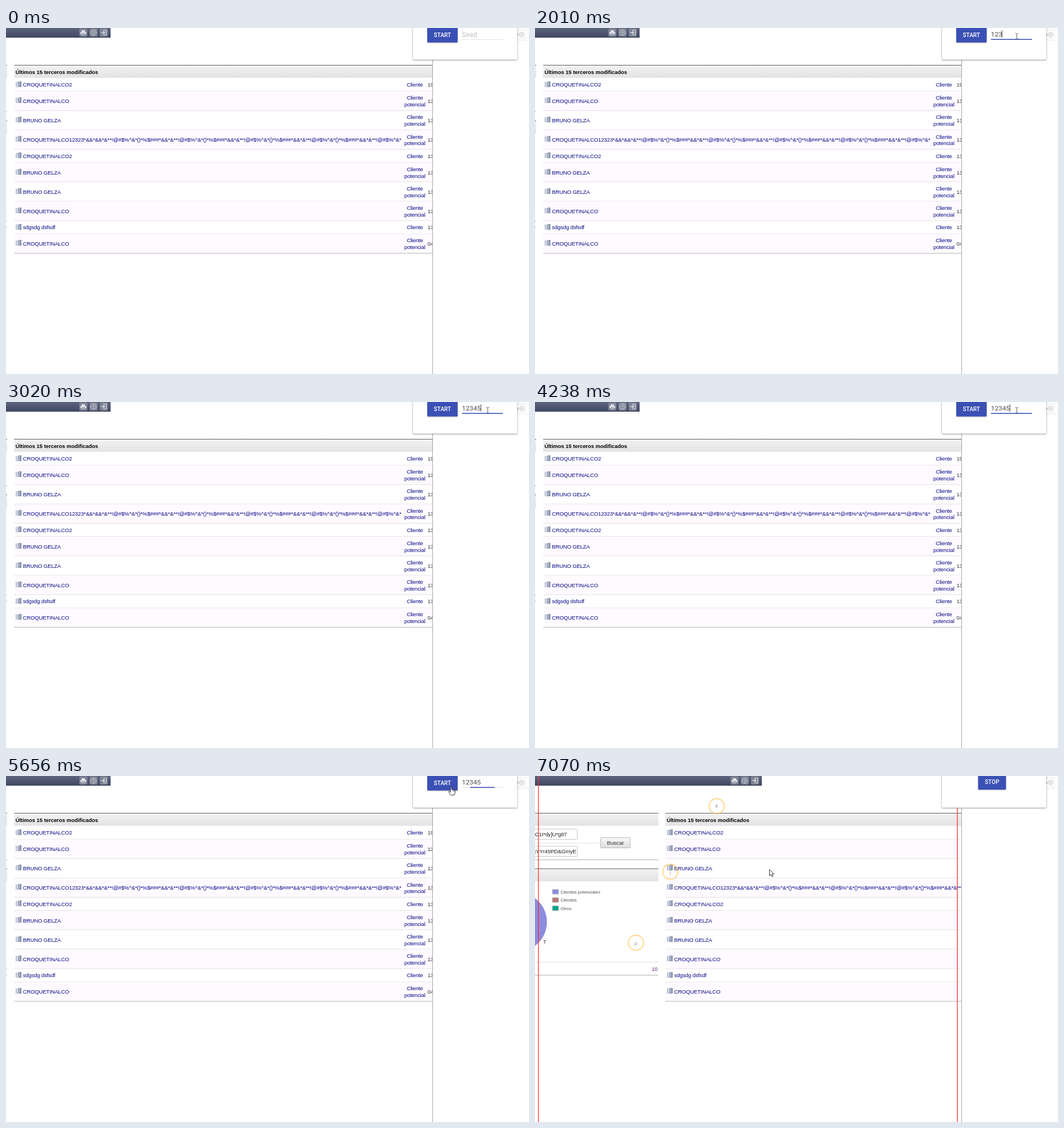
Write an HTML page with a canvas that moves like this. It is 920 by 609 pixels and loops after 8000 ms.

```html
<!DOCTYPE html>
<html lang="es">
<head>
<meta charset="utf-8">
<title>Terceros</title>
<style>
html, body { margin: 0; width: 100%; height: 100%; overflow: hidden; background: #fff; }
canvas { display: block; width: 920px; height: 609px; }
</style>
</head>
<body>
<canvas id="stage" width="920" height="609"></canvas>
<script>
const ctx = document.getElementById('stage').getContext('2d');
const LOOP = 8000;
const ZOOM = 0.775;
const EDGE = 968 * ZOOM;
const SCROLL = 215;
const ARIAL = '"Liberation Sans", Arial, sans-serif';
const ROBOTO = 'Roboto, sans-serif';
const BODY = { tracking: -0.18 };
const BODY_SIZE = 9.6;
const LINK = '#0a0a86';
const INDIGO = '#3a50b4';

// Each state holds until the next one starts.
const STATES = [
  { at: 0, hint: true },
  { at: 1000, focus: 1, cursor: beam, x: 847, y: 9 },
  { at: 2010, focus: 1, text: '123', caret: true, cursor: beam, x: 847, y: 9 },
  { at: 3020, focus: 1, text: '12345', caret: true, cursor: beam, x: 847, y: 9 },
  { at: 5050, focus: 0.6, text: '12345', cursor: hand, x: 778, y: 18 },
  { at: 6060, running: true, cursor: arrow, x: 362, y: 64 },
  { at: 7070, running: true, scrolled: true, cursor: arrow, x: 412, y: 164 }
];

const SHOP = 'CROQUETINALCO';
const PERSON = 'BRUNO GELZA';
const NOISE = '!@#$%^&*()*%$###*&&*&**';
const LONG = SHOP + '12323*&&*&&*&**' + NOISE.repeat(4) + '!@#$%^&*';
const ROWS = [
  { name: SHOP + '2', day: '19' },
  { name: SHOP, prospect: true },
  { name: PERSON, prospect: true },
  { name: LONG, prospect: true },
  { name: SHOP + '2' },
  { name: PERSON, prospect: true },
  { name: PERSON, prospect: true },
  { name: SHOP, prospect: true },
  { name: 'sdgsdg dsfsdf' },
  { name: SHOP, prospect: true, day: '04' }
];

function box(x, y, w, h, fill) {
  ctx.fillStyle = fill;
  ctx.fillRect(x, y, w, h);
}

function rule(x, y, w, color) {
  box(x, y, w, ZOOM, color);
}

function rounded(x, y, w, h, radius, fill) {
  ctx.beginPath();
  ctx.roundRect(x, y, w, h, radius);
  ctx.fillStyle = fill;
  ctx.fill();
}

function frame(x, y, w, h, fill, stroke, radius = 0) {
  rounded(x + 0.5, y + 0.5, w - 1, h - 1, radius, fill);
  ctx.strokeStyle = stroke;
  ctx.lineWidth = ZOOM;
  ctx.stroke();
}

function label(text, x, y, size, color, { font = ARIAL, weight = 400, align = 'left', tracking = 0 } = {}) {
  ctx.font = `${weight} ${size}px ${font}`;
  ctx.letterSpacing = `${tracking}px`;
  ctx.textAlign = align;
  ctx.fillStyle = color;
  ctx.fillText(text, x, y);
}

function fade(y, h, top, bottom) {
  const g = ctx.createLinearGradient(0, y, 0, y + h);
  g.addColorStop(0, top);
  g.addColorStop(1, bottom);
  return g;
}

function line(points, color, width = 1) {
  ctx.beginPath();
  points.forEach(([x, y]) => ctx.lineTo(x, y));
  ctx.strokeStyle = color;
  ctx.lineWidth = width;
  ctx.stroke();
}

function shadowed(alpha, blur, draw) {
  ctx.save();
  ctx.shadowColor = `rgba(0,0,0,${alpha})`;
  ctx.shadowBlur = blur;
  ctx.shadowOffsetY = 0.8;
  draw();
  ctx.restore();
}

function panelHead(x, y, w) {
  box(x, y, w, 22.5, fade(y, 22, '#f4f3f4', '#e4e2e4'));
  rule(x, y, w, '#333338');
}

function toolbar() {
  box(-10, 0, 409, 17, fade(0, 17, '#5c647e', '#3f4660'));
  const ink = '#dfe1e6';
  for (const x of [344, 362, 380]) frame(x, 1, 14, 14, '#7c8292', '#8f95a3', 1);
  box(348, 4, 6, 3, ink);
  box(346, 7, 10, 4, ink);
  box(348, 9, 6, 4, '#a9adb8');
  ctx.beginPath();
  ctx.arc(369, 8, 4.5, 0, 7);
  ctx.strokeStyle = ink;
  ctx.lineWidth = 1;
  ctx.stroke();
  label('?', 369, 11, 8, ink, { weight: 700, align: 'center' });
  line([[386, 4], [391.5, 4], [391.5, 12], [386, 12]], ink);
  line([[382.5, 8], [388.5, 8]], ink, 1.3);
  line([[386, 5.5], [388.7, 8], [386, 10.5]], ink, 1.3);
}

function building(x, y) {
  box(x, y + 1, 5, 9, '#b6bed0');
  box(x + 5, y, 5, 10, '#8f99b3');
  for (let i = 2; i < 9; i += 2) {
    box(x + 1, y + i, 3, 1, '#e2e7f0');
    box(x + 6, y + i - 1, 2, 1, '#c6cddc');
  }
  box(x + 9, y, 1, 10, '#727c98');
}

function searchPanel() {
  panelHead(-10, 65.1, 227);
  rule(-10, 117.8, 124, '#dcd8dc');
  rule(-10, 147.2, 227, '#98989c');
  frame(-20, 93, 95, 19, '#fff', '#b8b8b8', 1);
  frame(-20, 123, 95, 19, '#fff', '#b8b8b8', 1);
  ctx.save();
  ctx.beginPath();
  ctx.rect(-10, 90, 82, 55);
  ctx.clip();
  label('C1I*dy]U*g87', 0, 106.3, BODY_SIZE, '#222', BODY);
  label('xYYr45PD&GmyE', -3, 136.3, BODY_SIZE, '#222', BODY);
  ctx.restore();
  frame(115, 108, 53, 19, fade(108, 19, '#f8f8f8', '#dedede'), '#a8a8a8', 1);
  label('Buscar', 141.5, 121, 9.7, '#333', { align: 'center' });
}

function chartPanel() {
  panelHead(-10, 162.8, 227);
  ctx.beginPath();
  ctx.arc(-31.5, 257, 52.5, 0, 7);
  ctx.fillStyle = '#8c8ce0';
  ctx.fill();
  [['Clientes potenciales', '#8c8ce0'], ['Clientes', '#bb7777'], ['Otros', '#00a388']].forEach(([name, color], i) => {
    const y = 199 + i * 14.5;
    box(30, y, 12, 9.5, '#ccc');
    box(31, y + 1, 10, 7.5, color);
    label(name, 45, y + 7.5, 7.8, '#505050');
  });
  label('7', 14.5, 295, 8.2, '#000');
  rule(-10, 327, 227, '#dcd8dc');
  label('10', 205.3, 343, 9.4, '#551a6b');
  rule(-10, 350.3, 227, '#98989c');
}

function table() {
  panelHead(229.3, 65.1, 900);
  label('Últimos 15 terceros modificados', 231.7, 80.5, 9.42, '#000', { weight: 700 });
  let top = 113 * ZOOM;
  ROWS.forEach(({ name, prospect, day = '13' }, i) => {
    const height = (prospect ? 44 : 30) * ZOOM;
    const mid = top + (height + ZOOM) / 2;
    const bottom = top + height;
    if (i % 2) box(229.3, top + ZOOM, 900, height - ZOOM, '#fefaff');
    rule(229.3, bottom, 900, i === ROWS.length - 1 ? '#a5a3a6' : '#dbd6db');
    building(232, Math.floor(mid - 5.5));
    label(name, 244.7, mid + 3.8, BODY_SIZE, LINK, BODY);
    const tag = (text, y) => label(text, 934.2, y, BODY_SIZE, LINK, { ...BODY, align: 'center' });
    if (prospect) {
      tag('Cliente', mid - 1.9);
      tag('potencial', mid + 9.7);
    } else {
      tag('Cliente', mid + 3.5);
    }
    label(day, 956.6, mid + 3.8, BODY_SIZE, '#333', BODY);
    top = bottom;
  });
}

function page(scrolled) {
  ctx.save();
  ctx.beginPath();
  ctx.rect(0, 0, EDGE, 609);
  ctx.clip();
  if (!scrolled) ctx.translate(-SCROLL, 0);
  toolbar();
  searchPanel();
  chartPanel();
  table();
  ctx.restore();
  box(EDGE, 0, ZOOM, 609, '#8c8c8c');
}

function marks() {
  for (const x of [5.4, 742.3]) box(x, 0, 1.3, 609, '#ff3030');
  for (const [x, y, char] of [[319.5, 53, 'é'], [238, 168.5, '|'], [177.5, 293.5, 'µ']]) {
    ctx.beginPath();
    ctx.arc(x, y, 13.3, 0, 7);
    ctx.strokeStyle = 'rgba(255,190,70,0.6)';
    ctx.lineWidth = 2;
    ctx.stroke();
    label(char, x, y + 3, 8.5, '#999', { align: 'center' });
  }
}

function closeTab() {
  rule(899, 2, 21, '#ededed');
  rule(899, 21, 21, '#e4e4e4');
  frame(897, 4, 17, 15, '#fff', '#e6e6e6');
  box(900, 10, 1, 4, '#999');
  ctx.beginPath();
  ctx.arc(907, 11.5, 4, 0, 7);
  ctx.strokeStyle = '#bcbcbc';
  ctx.lineWidth = 1;
  ctx.stroke();
  line([[905.3, 9.8], [908.7, 13.2]], '#b0b0b0');
  line([[908.7, 9.8], [905.3, 13.2]], '#b0b0b0');
}

function button(text, x, w, bottom) {
  shadowed(0.3, 2, () => rounded(x, -6, w, bottom + 6, 1.5, INDIGO));
  label(text, x + w / 2, bottom - 9.6, 10.05, '#fff', { font: ROBOTO, weight: 500, align: 'center' });
}

function seedField({ hint, focus = 0, text = '', caret }) {
  rule(802, 20, 72, '#d8d8d8');
  const w = 72 * focus;
  box(838 - w / 2, 19.3, w, 2 * ZOOM, INDIGO);
  if (hint) label('Seed', 801.5, 15.5, 12.4, '#c4c4c4', { font: ROBOTO });
  label(text, 802, 14.9, 11.8, '#505050', { font: ROBOTO });
  if (caret) box(Math.floor(802 + ctx.measureText(text).width), 4, ZOOM, 13, '#222');
}

function popup(state) {
  shadowed(0.5, 2.5, () => rounded(715.7, -8, 183.8, 63.7, 1.5, '#fff'));
  if (state.running) {
    button('STOP', 779.5, 49, 24);
  } else {
    button('START', 741, 53.5, 25.5);
    seedField(state);
  }
}

function beam() {
  line([[-2, 0.5], [-0.5, 0.5], [0.5, 1.5], [1.5, 0.5], [3, 0.5]], '#333', ZOOM);
  line([[0.5, 1], [0.5, 10]], '#333', ZOOM);
  line([[-2, 10.5], [-0.5, 10.5], [0.5, 9.5], [1.5, 10.5], [3, 10.5]], '#333', ZOOM);
}

function outline(path) {
  const shape = new Path2D(path);
  ctx.fillStyle = '#fff';
  ctx.fill(shape);
  ctx.strokeStyle = '#222';
  ctx.lineWidth = 0.9;
  ctx.lineJoin = 'round';
  ctx.stroke(shape);
}

function hand() {
  outline('M4 9V2Q5 .2 6 2V6Q8 5.2 8.2 6.8Q10 6 10.2 7.5Q12 7 12 8.8V12L10.5 15.5H4.5L1 10.5Q.6 8.5 2.2 8.8L4 10.5Z');
  line([[8.2, 7], [8.2, 9.5]], '#222', 0.6);
  line([[10.2, 8], [10.2, 10]], '#222', 0.6);
}

function arrow() {
  outline('M.5 .5V11.5L3 9.2L4.8 13.2L6.7 12.4L4.9 8.5H8.2Z');
}

function render(now) {
  const t = now % LOOP;
  const state = STATES.findLast(s => s.at <= t) || STATES[0];
  box(0, 0, 920, 609, '#fff');
  page(state.scrolled);
  closeTab();
  if (state.scrolled) marks();
  popup(state);
  if (state.cursor) {
    ctx.save();
    ctx.translate(state.x, state.y);
    state.cursor();
    ctx.restore();
  }
}

const start = performance.now();
function tick() {
  render(performance.now() - start);
  requestAnimationFrame(tick);
}
tick();
</script>
</body>
</html>
```
